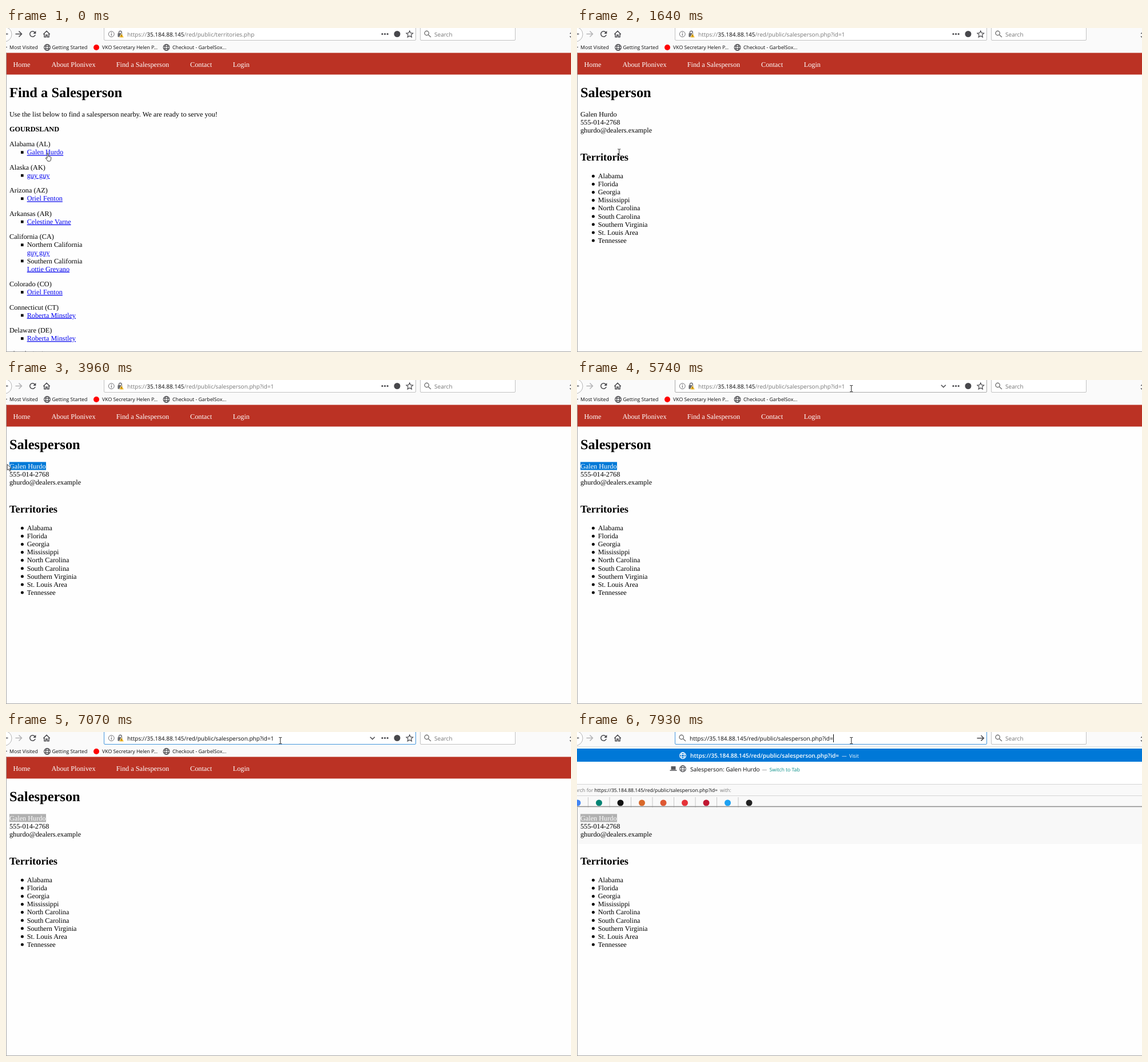
An HTML page for the animation above (8000 ms loop, 988x567 px).

```html
<!DOCTYPE html>
<html lang="en">
<head>
<meta charset="utf-8">
<title>Find a Salesperson</title>
<style>
  html, body { margin: 0; width: 100%; height: 100%; overflow: hidden; background: #fefefe; }
  svg { display: block; }
  text { white-space: pre; text-rendering: geometricPrecision; }
  .page { font: 12.24px "Liberation Serif", "Times New Roman", serif; fill: #000; }
  .h1 { font-size: 24.48px; font-weight: bold; }
  .h2 { font-size: 18.36px; font-weight: bold; }
  .b { font-weight: bold; }
  .link { fill: #00e; text-decoration: underline; }
  .ui { font: 10.04px "Open Sans", "Noto Sans", sans-serif; fill: #0c0c0d; }
  .mark { font-size: 8.75px; }
  .small { font-size: 8.68px; }
  .best { font-size: 10.14px; font-weight: 600; }
  .foot { font-size: 8.64px; }
  .dim { fill: #777; }
  .icon { fill: none; stroke: #48484c; stroke-width: 1.5; }
  .off { display: none; }
</style>
</head>
<body>
<svg id="stage" width="988" height="567" viewBox="0 0 988 567">
  <defs>
    <g id="globe" fill="none" stroke-width="1.1">
      <circle r="5.4"/><ellipse rx="2.5" ry="5.4"/><path d="M-5 -1.9H5M-5 1.9H5"/>
    </g>
    <g id="lens" fill="none" stroke="#737373" stroke-width="1.4">
      <circle cx="-1.3" cy="-1.5" r="3.7"/><path d="M1.4 1.2L6 5.5"/>
    </g>
    <clipPath id="selClip"><rect id="selBox" y="143.5" height="14" width="64"/></clipPath>
    <clipPath id="dropClip"><rect id="dropBox" width="988" height="196"/></clipPath>
  </defs>

  <rect width="988" height="567" fill="#fefefe"/>
  <rect id="shade" y="130" width="988" height="66" fill="#f8f8f8"/>
  <g id="list" class="page"></g>
  <g id="person" class="page"></g>
  <g id="sel" class="page">
    <rect id="selFill" y="143.5" height="14"/>
    <text x="6" y="154.5" fill="#fff" clip-path="url(#selClip)">Galen Hurdo</text>
  </g>

  <rect width="988" height="43.5" fill="#fafafa"/>
  <rect y="43.5" width="988" height="38" fill="#bb3224"/>
  <g id="nav" class="page" style="fill:#fff"></g>
  <path d="M.5 43V567M0 566.5H988" stroke="#a5a5a5" fill="none"/>

  <!-- toolbar -->
  <circle cx="-3" cy="11" r="13" fill="#fff" stroke="#b5b5b5"/>
  <path class="icon" d="M0 10.5H3.5"/>
  <path id="forward" class="icon" d="M16.5 10.5H27.5M22.5 5.5l5 5l-5 5"/>
  <g transform="translate(46.5 10.5)">
    <g id="reload"><path class="icon" d="M4 -2.8A4.8 4.8 0 1 0 4.7 1.4"/><path d="M5.8 -5.5V-.6H.9z" fill="#48484c"/></g>
    <path id="stop" class="icon" d="M-4.5 -4.5l9 9M4.5 -4.5l-9 9"/>
  </g>
  <path class="icon" d="M65.3 11L71 5.3L76.7 11M67 10v5.8h2.8v-3.6h2.4v3.6h2.8V10"/>
  <rect id="bar" x="171.5" y="-4" width="545" height="25.5" rx="1.5" fill="#fff"/>
  <rect x="724.5" y="-4" width="166" height="25.5" rx="1.5" fill="#fff" stroke="#c2c2c2"/>
  <use href="#lens" x="737" y="10.5"/>
  <text class="ui dim" x="749" y="15.2">Search</text>
  <path d="M988 8.5l-1.8 1.6M986 14.5l2 1.8" stroke="#48484c" fill="none" stroke-width="1.4"/>

  <g id="idle">
    <circle cx="184.3" cy="10.7" r="4.9" fill="none" stroke="#6c6c70"/>
    <path d="M184.3 9.8v3.6M184.3 7.5v1.3" stroke="#6c6c70" stroke-width="1.2"/>
    <path d="M197.4 9V7.6a2.4 2.4 0 0 1 4.8 0V9" fill="none" stroke="#6c6c70" stroke-width="1.4"/>
    <rect x="195.4" y="9" width="8" height="6.8" rx="1" fill="#6c6c70"/>
    <path d="M202 9.3l4.2 7.4h-8.4z" fill="#f5b921" stroke="#fff" stroke-width=".6"/>
    <path d="M202 11.8v2.2M202 14.8v.9" stroke="#50400a" stroke-width=".9"/>
    <rect id="urlSel" x="212" y="3" width="257" height="15" fill="#0078d7"/>
    <text class="ui" id="url" x="212" y="15.2"><tspan>https://</tspan><tspan id="host">35.184.88.145</tspan><tspan id="path"></tspan></text>
    <path id="chevron" class="icon" d="M636.8 8.8l4 4l4 -4"/>
    <g fill="#48484c"><circle cx="658" cy="10.5" r="1.6"/><circle cx="662.6" cy="10.5" r="1.6"/><circle cx="667.2" cy="10.5" r="1.6"/><circle cx="684" cy="10.5" r="5.5"/></g>
    <path class="icon" style="stroke-width:1.2" d="M705.8 4.9l1.7 3.8l4.1 .4l-3.1 2.8l.9 4.1l-3.6 -2.1l-3.6 2.1l.9 -4.1l-3.1 -2.8l4.1 -.4z"/>
  </g>
  <path id="caret" d="M468.5 3.5V18" stroke="#000"/>
  <g id="typing">
    <use href="#lens" x="184" y="10.5"/>
    <text class="ui" x="197" y="15.2">https://35.184.88.145/red/public/salesperson.php?id=</text>
    <path d="M448.5 4V18" stroke="#000"/>
    <path class="icon" d="M699.5 10.7H711M706.5 6l4.8 4.7l-4.8 4.7"/>
  </g>

  <!-- bookmarks -->
  <g class="ui">
    <path d="M0 33.5h2" stroke="#48484c"/>
    <text class="mark" x="6" y="37.3">Most Visited</text>
    <use href="#globe" x="72" y="34" stroke="#48484c"/>
    <text class="mark" x="80.5" y="37.3">Getting Started</text>
    <circle cx="158" cy="34" r="5" fill="#f00"/>
    <text class="mark" x="168" y="37.3">VKO Secretary Helen P...</text>
    <use href="#globe" x="280.5" y="34" stroke="#48484c"/>
    <text class="mark" x="291" y="37.3">Checkout - GarbelSox...</text>
  </g>

  <!-- address suggestions -->
  <g id="drop" class="ui" clip-path="url(#dropClip)">
    <rect y="25.5" width="988" height="170" fill="#fff"/>
    <path d="M0 26H988" stroke="#d0d0d0"/>
    <rect y="29" width="988" height="23" fill="#0078d7"/>
    <use href="#globe" x="185" y="41.3" stroke="#fff"/>
    <text x="198" y="45.4" fill="#fff"><tspan class="best">https://35.184.88.145/red/public/salesperson.php?id=</tspan><tspan x="463" class="small">—</tspan><tspan x="476" class="small">Visit</tspan></text>
    <path d="M164.5 60h8v6h-8zM162.5 66.5h12v1.5h-12z" fill="#58585c"/>
    <g id="rows"></g>
    <g id="foot">
      <rect id="footBg" y="148" width="988" height="46.5"/>
      <path d="M0 148.5H988M0 168.5H988" stroke="#d5d5d5"/>
      <text class="foot dim" x="28.3" y="161.8" text-anchor="end">Search for</text>
      <text class="foot" x="30.5" y="161.8">https://35.184.88.145/red/public/salesperson.php?id=</text>
      <text class="foot dim" x="250" y="161.8">with:</text>
      <g id="engines"></g>
    </g>
    <path id="dropEdge" d="M0 194.5H988" stroke="#8c8c8c" stroke-width="1.5"/>
  </g>

  <!-- pointers -->
  <path id="beam" d="M-2.5 -5.5H-.7L0 -5L.7 -5.5H2.5M0 -5V5M-2.5 5.5H-.7L0 5L.7 5.5H2.5" fill="none" stroke="#222"/>
  <path id="arrow" d="M0 0V10.2L2.3 8.2L3.9 12L5.6 11.2L4 7.5H7z" fill="#fff" stroke="#222" stroke-width=".9"/>
  <path id="hand" d="M-2 -6.5q1.1 -1.2 2 .1v4.9l3.5 .8q1.6 .4 1.4 2l-.6 3.6q-.3 1.7 -1.3 2.2h-4q-1.4 -2.5 -3.7 -5.3q.6 -1.5 1.7 -.6l1 .9z" fill="#fff" stroke="#222" stroke-width=".9"/>
</svg>
<script>
const $ = id => document.getElementById(id);
const text = (x, y, s, cls = '') => `<text x="${x}" y="${y}" class="${cls}">${s}</text>`;
const square = y => `<rect x="26" y="${y - 6}" width="4.6" height="4.6"/>`;
const disc = y => `<circle cx="28.4" cy="${y - 3.8}" r="2.5"/>`;

$('nav').innerHTML = [[12.5, 'Home'], [79.5, 'About Plonivex'], [192.7, 'Find a Salesperson'],
  [322, 'Contact'], [396.7, 'Login']].map(([x, s]) => text(x, 68.2, s)).join('');

// A state with one seller, or with several named regions.
const states = [
  ['Alabama (AL)', 'Galen Hurdo'], ['Alaska (AK)', 'guy guy'], ['Arizona (AZ)', 'Oriel Fenton'],
  ['Arkansas (AR)', 'Celestine Varne'],
  ['California (CA)', 'Northern California', 'guy guy', 'Southern California', 'Lottie Grevano'],
  ['Colorado (CO)', 'Oriel Fenton'], ['Connecticut (CT)', 'Roberta Minstley'],
  ['Delaware (DE)', 'Roberta Minstley'], ['Florida (FL)']
];
let y = 207.2;
let list = text(6, 121, 'Find a Salesperson', 'h1') +
  text(6, 154.5, 'Use the list below to find a salesperson nearby. We are ready to serve you!') +
  text(6, 181, 'GOURDSLAND', 'b');
for (const [name, ...lines] of states) {
  list += text(6, y, name);
  lines.forEach((s, i) => {
    y += 14.1;
    const region = lines.length > 1 && i % 2 === 0;
    if (region || lines.length === 1) list += square(y);
    list += text(36.7, y, s, region ? '' : 'link');
  });
  y += 26.4;
}
$('list').innerHTML = list;

const areas = ['Alabama', 'Florida', 'Georgia', 'Mississippi', 'North Carolina', 'South Carolina',
  'Southern Virginia', 'St. Louis Area', 'Tennessee'];
$('person').innerHTML = text(6, 121, 'Salesperson', 'h1') +
  ['Galen Hurdo', '555-014-2768', 'ghurdo@dealers.example'].map((s, i) => text(6, 154.5 + 14.1 * i, s)).join('') +
  text(6, 232, 'Territories', 'h2') +
  areas.map((s, i) => disc(263 + 14.1 * i) + text(36.7, 263 + 14.1 * i, s)).join('');

const base = 'https://35.184.88.145/red/public/';
$('rows').innerHTML = [
  ['Salesperson: Galen Hurdo', 323.5, 'Switch to Tab', '#008c84'],
  ['Plonivex', 243, base, '#2a7bd6'],
  ['Staff: Users', 255.5, base + 'staff/users/index.php', '#2a7bd6'],
  ['Staff: Feedback', 274.5, base + 'staff/feedback/index.php', '#2a7bd6']
].map(([title, x, note, color], i) => {
  const cy = 64.3 + 23 * i;
  return `<g><use href="#globe" x="185" y="${cy}" stroke="#58585c"/>${text(198, cy + 4.4, title)}` +
    `${text(x, cy + 4.4, '—', 'small dim')}<text class="small" x="${x + 13}" y="${cy + 4.4}" style="fill:${color}">${note}</text></g>`;
}).join('');

const engines = ['#4285f4', '#008373', '#111', '#d8682a', '#de5833', '#e53238', '#c01832', '#1da1f2', '#222'];
$('engines').innerHTML = engines.map((color, i) => {
  const x = 1 + 37.5 * i;
  const divider = i < engines.length - 1 ? `<path d="M${x + 18.5} 171V191" stroke="#c6c6c6"/>` : '';
  return `<circle cx="${x}" cy="181" r="5.5" fill="${color}"/>${divider}`;
}).join('');

// Each list holds [start time, values...]; the last entry begun is in force.
const pointer = [
  [0, 'hand', 74, 226], [150, 'hand', 74, 225], [970, 'beam', 73.7, 217.5],
  [2200, 'beam', 64, 209], [2320, 'beam', 53, 203], [2470, 'beam', 45, 150.5],
  [2720, 'beam', 52, 150.5], [2870, 'beam', 75, 155], [3020, 'beam', 76, 155],
  [3420, 'beam', 55, 152], [3540, 'beam', 30, 150], [3690, 'beam', 14, 150],
  [3810, 'beam', 8, 150], [3960, 'arrow', 2.3, 147.5], [4520, 'arrow', 70, 126],
  [4640, 'arrow', 300, 62], [4760, 'beam', 512, 9], [4920, 'beam', 489, 19],
  [5320, 'beam', 478, 13], [5440, 'beam', 468, 7], [5590, 'beam', 474.5, 11.5], [5740, 'beam', 479.8, 15]
];
const drag = [[0, 70], [3420, 55], [3540, 30], [3690, 14], [3810, 6]];
const spinner = [ // reload angle or null, then size of the stop cross
  [0, 0, 0], [700, null, .6], [820, null, 1], [1120, null, .6],
  [1250, -120, 0], [1390, -45, 0], [1640, 0, 0]
];
const at = (steps, t) => steps.findLast(s => s[0] <= t);
const show = (id, on) => $(id).classList.toggle('off', !on);
const set = (id, attrs) => { for (const k in attrs) $(id).setAttribute(k, attrs[k]); };

function draw(t) {
  const opened = t >= 970, focused = t >= 6020, typing = t >= 7630, closing = t >= 7930;
  const picked = t >= 6140 && t < 6820;

  show('list', !opened);
  show('person', opened);
  show('shade', closing);
  set('forward', { style: `stroke:${opened ? '#b4b4b6' : '#48484c'}` });

  const [, angle, cross] = at(spinner, t);
  show('reload', angle !== null);
  set('reload', { transform: `rotate(${angle || 0})` });
  show('stop', cross > 0);
  set('stop', { transform: `scale(${cross})` });

  const x = at(drag, t)[1];
  show('sel', x < 70);
  set('selFill', { x, width: 70 - x, fill: focused ? '#b0b0b0' : '#0078d7' });
  set('selBox', { x, width: 70 - x });

  set('bar', { stroke: focused ? '#4596dc' : t >= 4760 ? '#aaa' : '#c2c2c2' });
  show('idle', !typing);
  show('typing', typing);
  show('urlSel', picked);
  show('chevron', t >= 4760);
  show('caret', t >= 6820 && t < 7070);
  const ink = picked ? '#fff' : '#0c0c0d';
  set('url', { style: `fill:${focused ? ink : '#777'}` });
  set('host', { style: `fill:${ink}` });
  $('path').textContent = '/red/public/' + (opened ? 'salesperson.php?id=1' : 'territories.php');

  show('drop', typing);
  set('dropBox', { height: closing ? 132 : 196 });
  set('foot', { transform: `translate(0 ${closing ? -57 : 0})` });
  set('footBg', { fill: closing ? '#f9f9f9' : '#ededed' });
  set('dropEdge', { transform: `translate(0 ${closing ? -64 : 0})` });
  [...$('rows').children].forEach((row, i) => row.classList.toggle('off', closing && i > 0));

  const [, kind, px, py] = at(pointer, t);
  for (const id of ['beam', 'arrow', 'hand']) show(id, id === kind);
  set(kind, { transform: `translate(${px} ${py})` });
}

const start = performance.now();
function tick() {
  draw((performance.now() - start) % 8000);
  requestAnimationFrame(tick);
}
tick();
</script>
</body>
</html>
```
